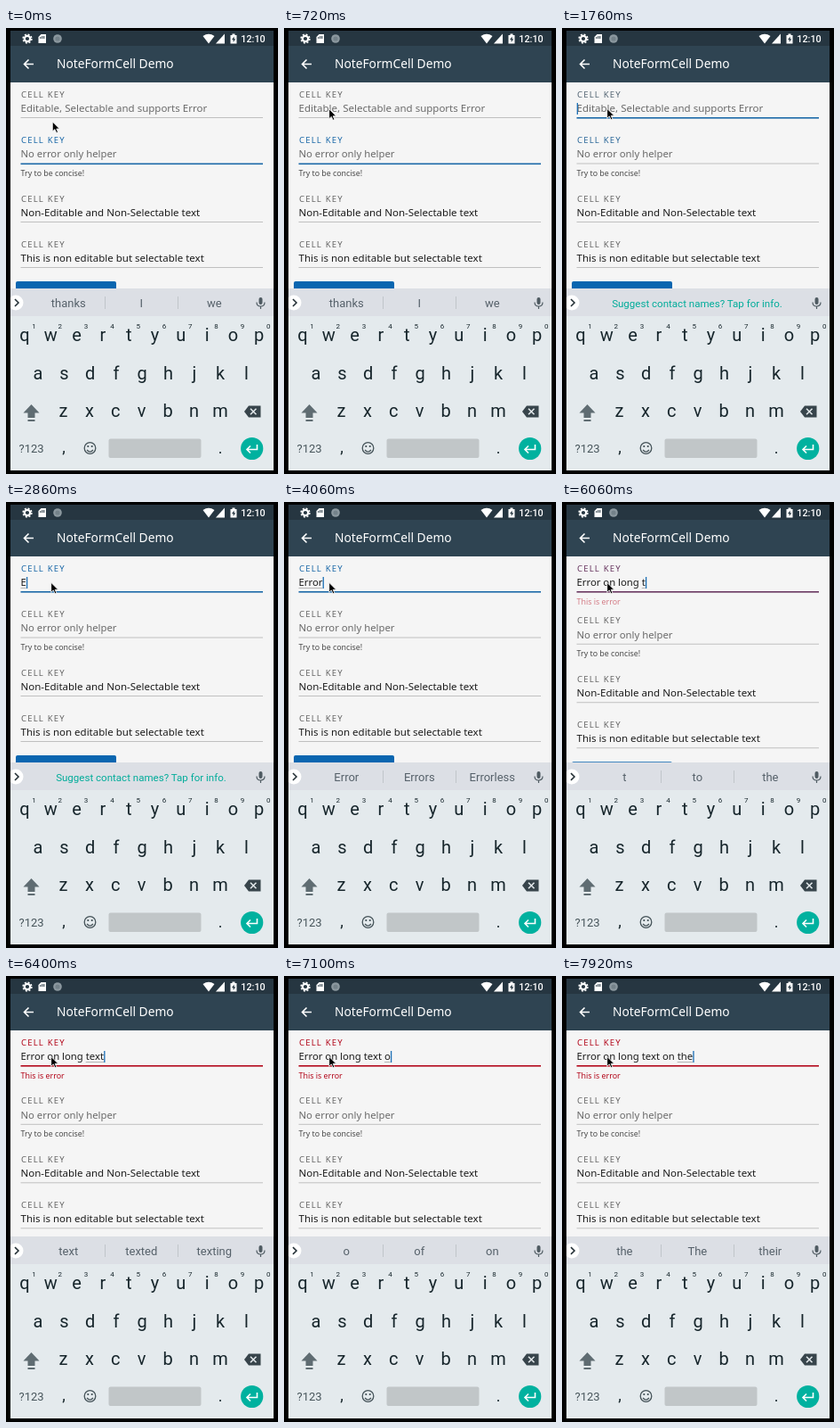
Write an HTML page that moves like this. It is 306 px wide and 500 px high and loops after 8 s.

```html
<!DOCTYPE html>
<html lang="en">
<head>
<meta charset="utf-8">
<title>NoteFormCell Demo</title>
<style>
  html, body { margin: 0; width: 100%; height: 100%; overflow: hidden; background: #000; }
  svg { display: block; }
  text { white-space: pre; }
  .form { font-family: "Noto Sans", sans-serif; }
  .label { font-size: 9.5px; letter-spacing: 1.2px; }
  .value { font-size: 11.5px; fill: #1c1c1c; }
  .hint { fill: #6a6a6a; }
  .narrow { font-size: 11.3px; }
  .helper { font-size: 8.85px; fill: #4a4a4a; }
  .keys { font-family: Roboto, sans-serif; fill: #17262c; text-anchor: middle; }
  .keys .word { font-size: 13px; fill: #56616a; }
</style>
</head>
<body>
<svg width="306" height="500" viewBox="0 0 306 500">
  <defs>
    <clipPath id="screen"><path d="M5 3H301V496H5Z"/></clipPath>
    <clipPath id="content"><path d="M5 61H301V292H5Z"/></clipPath>
  </defs>
  <rect width="306" height="500"/>
  <g clip-path="url(#screen)">
    <rect x="5" y="3" width="296" height="493" fill="#f5f5f5"/>

    <!-- status bar and title bar -->
    <rect x="5" y="3" width="296" height="18" fill="#263641"/>
    <rect x="5" y="20" width="296" height="41" fill="#2f4452"/>
    <g fill="#fff">
      <circle cx="24" cy="12" r="3.2" fill="none" stroke="#fff" stroke-width="2.2"/>
      <circle cx="24" cy="12" r="4.9" fill="none" stroke="#fff" stroke-width="1.5" stroke-dasharray="2 1.85"/>
      <path d="M39.500 7H45V17H36.500V10Z"/>
      <path d="M38.800 10V12M40.800 9V12M42.800 9V12" stroke="#263641"/>
      <circle cx="58" cy="12" r="4.8" fill="#8c989f"/>
      <circle cx="58" cy="12" r="2.600" fill="#74828a"/>
      <path d="M221.500 9Q228 4.500 234.500 9L228 17.500Z"/>
      <path d="M246 6.500V17.500H236Z"/>
      <path d="M252.500 8H254.500V6.500H257.500V8H259.500V17.500H252.500Z"/>
      <path d="M256.600 9.500L254 13.200H255.700V16L258.200 12.300H256.600Z" fill="#263641"/>
      <text x="264.300" y="16" font-family="Roboto, sans-serif" font-size="10.800" font-weight="500">12:10</text>
      <path d="M31 40.500H21M25.500 35.500L20.500 40.500L25.500 45.500" fill="none" stroke="#fff" stroke-width="1.600"/>
      <text x="57" y="45" class="form" font-size="13.750" font-weight="500">NoteFormCell Demo</text>
    </g>

    <!-- form -->
    <g class="form" clip-path="url(#content)">
      <text class="label" id="label1" x="17" y="77.600">CELL KEY</text>
      <text class="value hint" id="hint1" x="16.500" y="93.800">Editable, Selectable and supports Error</text>
      <text class="value narrow" id="typed" x="16.500" y="93.800"></text>
      <rect id="composing" y="96" height=".8" fill="#555" opacity=".5"/>
      <rect id="caret" y="84" width="1.300" height="13" fill="#1c6fb5"/>
      <rect id="line1" x="16.500" width="272.500" y="100"/>
      <text class="helper" id="error" x="16.500" y="115" style="fill:#b3091c">This is error</text>
      <g id="rest">
        <text class="label" id="label2" x="17" y="129">CELL KEY</text>
        <text class="value hint narrow" x="16.500" y="145.300">No error only helper</text>
        <rect id="line2" x="16.500" width="272.500" y="151.500"/>
        <text class="helper" x="16.500" y="166">Try to be concise!</text>
        <text class="label" x="17" y="195.200" fill="#666">CELL KEY</text>
        <text class="value" x="16.500" y="210.700">Non-Editable and Non-Selectable text</text>
        <text class="label" x="17" y="245.900" fill="#666">CELL KEY</text>
        <text class="value" x="16.500" y="261.800">This is non editable but selectable text</text>
        <path d="M16.500 217.500H289M16.500 268.500H289" stroke="#c0c0c0"/>
        <rect x="11" y="284" width="113" height="30" rx="2" fill="#0a66b0"/>
      </g>
    </g>

    <!-- keyboard -->
    <rect x="5" y="292" width="296" height="204" fill="#e4eaed"/>
    <rect x="5" y="292" width="296" height="31" fill="#dcdfe5"/>
    <circle cx="11" cy="308" r="8.500" fill="#fff"/>
    <path d="M10 304L14 308L10 312" fill="none" stroke="#263238" stroke-width="1.600"/>
    <g fill="#4f5b62">
      <rect x="284.500" y="302" width="4" height="8" rx="2"/>
      <path d="M282 307.500C282 313.500 291 313.500 291 307.500M286.500 312V315" fill="none" stroke="#4f5b62" stroke-width="1.200"/>
    </g>
    <g class="keys" id="keys">
      <path id="dividers" d="M111.500 301V315M193.500 301V315" stroke="#c0c5ca"/>
      <text class="word" x="70.300" y="313"></text>
      <text class="word" x="152.300" y="313"></text>
      <text class="word" x="234.300" y="313"></text>
      <text id="notice" x="152" y="312.500" font-size="11.550" fill="#00ac9a">Suggest contact names? Tap for info.</text>
      <text x="28.600" y="476" font-size="13" fill="#46545a">?123</text>
      <text x="65" y="476" font-size="18">,</text>
      <text x="241" y="476.500" font-size="18">.</text>
    </g>
    <path d="M28.500 422L37.500 431.500H32.500V437H24.500V431.500H19.500ZM24.500 439H32.500V441H24.500Z" fill="#5f6c72"/>
    <path d="M268 430L273 423.500H286.500V436.500H273Z" fill="#37444b"/>
    <path d="M275 426.800L281.500 433.300M281.500 426.800L275 433.300" stroke="#e4eaed" stroke-width="1.500"/>
    <g fill="none" stroke="#46545a" stroke-width="1.300">
      <circle cx="94.500" cy="471" r="6.300"/>
      <path d="M91.100 473Q94.500 477.300 97.900 473"/>
      <path d="M92.300 468V470M96.700 468V470" stroke-width="1.700"/>
    </g>
    <rect x="115.500" y="460.500" width="104" height="21.500" rx="2" fill="#c1c6c8"/>
    <circle cx="276.700" cy="471.500" r="12.600" fill="#00b19f"/>
    <path d="M282.500 467V472.500H271.500M275 468.500L271 472.500L275 476.500" fill="none" stroke="#fff" stroke-width="1.600"/>

    <path id="mouse" d="M0 0V11L2.600 8.600L4.400 12.500L6.200 11.700L4.500 8H8Z" stroke="#fff" stroke-width=".8"/>
  </g>
</svg>
<script>
const LOOP = 8000, FOCUS = 1750, ERROR = 5960;
const BLUE = [28, 105, 168], RED = [179, 9, 28], GRAY = [102, 102, 102];
const $ = id => document.getElementById(id);
const words = document.querySelectorAll(".word");
const measure = document.createElement("canvas").getContext("2d");
measure.font = '11.3px "Noto Sans", sans-serif';

// start time, typed text, suggestions (* marks bold; none shows the notice)
const steps = [
  [0, "", "thanks|I|we"],
  [FOCUS, "", ""],
  [2860, "E", ""],
  [3160, "Er", "Er|Error|Errands"],
  [3460, "Erro", "Erro|*Error|Errors"],
  [4060, "Error", "Error|Errors|Errorless"],
  [4340, "Error ", "in|and|is"],
  [4540, "Error o", "o|of|on"],
  [4720, "Error on", "on|one|only"],
  [4860, "Error on ", "your|the|my"],
  [4920, "Error on l", "l|like|love"],
  [4980, "Error on lo", "lo|*love|look"],
  [5060, "Error on lon", "lon|*long|Long"],
  [5200, "Error on long", "long|Long|longer"],
  [5360, "Error on long ", "time|as|way"],
  [5960, "Error on long t", "t|to|the"],
  [6100, "Error on long te", "te|*the|tell"],
  [6240, "Error on long tex", "tex|*text|Tex"],
  [6380, "Error on long text", "text|texted|texting"],
  [6780, "Error on long text ", "me|to|and"],
  [6960, "Error on long text o", "o|of|on"],
  [7120, "Error on long text on", "on|one|only"],
  [7280, "Error on long text on ", "your|the|my"],
  [7660, "Error on long text on t", "t|to|the"],
  [7760, "Error on long text on th", "th|*the|that"],
  [7920, "Error on long text on the", "the|The|their"],
];

function set(el, attrs) {
  for (const name in attrs) el.setAttribute(name, attrs[name]);
}

function addKey(label, x, y, size) {
  const key = document.createElementNS("http://www.w3.org/2000/svg", "text");
  set(key, { x, y, "font-size": size });
  key.textContent = label;
  $("keys").append(key);
}

function addRow(letters, x, pitch, y) {
  [...letters].forEach((letter, i) => {
    const cx = x + i * pitch;
    addKey(letter, cx, y, 20);
    if (letters.length === 10) addKey((i + 1) % 10, cx + 10.5, 336.5, 8);
  });
}

const show = (el, on) => el.style.display = on ? "" : "none";
const ramp = (t, from, to) => Math.min(1, Math.max(0, (t - from) / (to - from)));
const ease = p => p * p * (3 - 2 * p);
const mix = (a, b, p) => `rgb(${a.map((v, i) => Math.round(v + (b[i] - v) * p))})`;

function drawLine(el, active, color) {
  set(el, active ? { height: 1.6, fill: color } : { height: 1, fill: "#c0c0c0" });
}

function draw(t) {
  const [, text, suggestions] = steps.findLast(step => step[0] <= t);
  const focus = t >= FOCUS;
  const tint = ramp(t, FOCUS, FOCUS + 50);
  const error = ease(ramp(t, ERROR, ERROR + 200));

  const accent = mix(BLUE, RED, error);
  set($("label1"), { fill: error ? accent : mix(GRAY, BLUE, tint) });
  set($("label2"), { fill: mix(BLUE, GRAY, tint) });
  drawLine($("line1"), focus, accent);
  drawLine($("line2"), !focus, accent);
  set($("error"), { opacity: error });
  set($("rest"), { transform: `translate(0 ${14.3 * error})` });

  $("typed").textContent = text;
  show($("hint1"), !text);
  const end = 16.5 + measure.measureText(text).width;
  const start = 16.5 + measure.measureText(text.slice(0, text.lastIndexOf(" ") + 1)).width;
  set($("composing"), { x: start, width: end - start });
  set($("caret"), { x: end + .2 });
  show($("caret"), focus && (t < 2360 || text));

  show($("notice"), !suggestions);
  show($("dividers"), suggestions);
  const list = suggestions.split("|");
  words.forEach((word, i) => {
    const item = list[i] || "";
    word.textContent = item.replace("*", "");
    set(word, { "font-weight": item[0] === "*" ? 700 : 400 });
  });

  const move = ease(ramp(t, 20, 360));
  const nudge = ramp(t, 1260, 1440);
  set($("mouse"), { transform: `translate(${52.3 - 1.6 * move} ${105 - 14.2 * move - .5 * nudge})` });
}

addRow("qwertyuiop", 21, 29.3, 351);
addRow("asdfghjkl", 36, 29.3, 393.6);
addRow("zxcvbnm", 64.5, 29.4, 436);

const began = performance.now();
(function tick() {
  draw((performance.now() - began) % LOOP);
  requestAnimationFrame(tick);
})();
</script>
</body>
</html>
```
